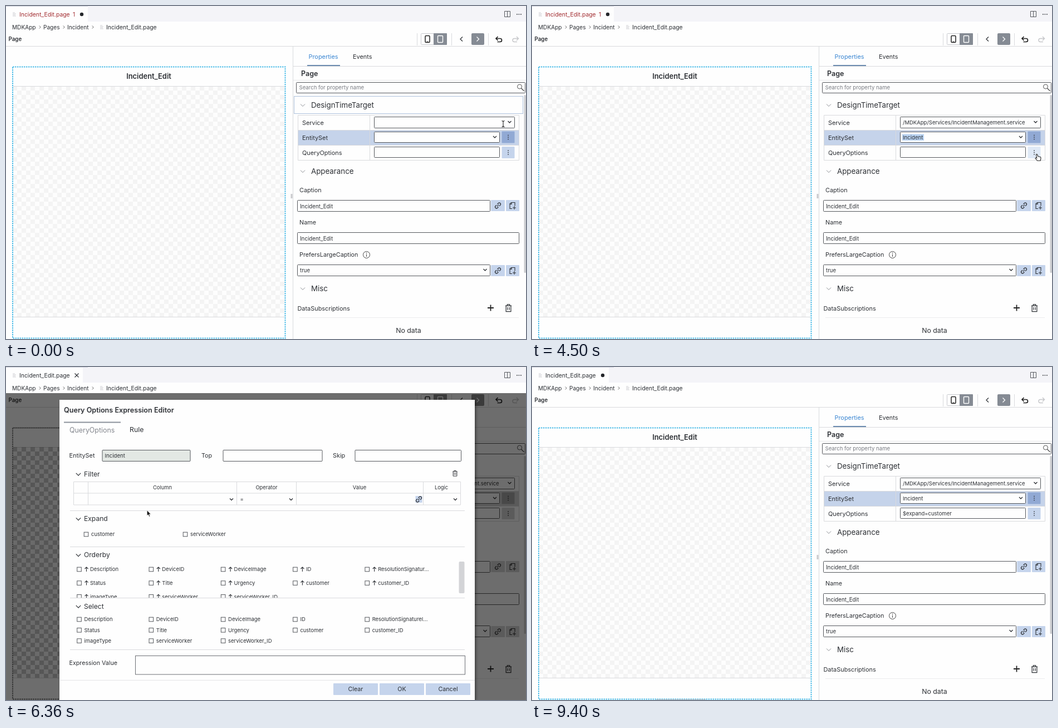
These frames come from a looping animation (934 px wide and 599 px high, 9900 ms). An HTML page:

```html
<!DOCTYPE html>
<html lang="en">
<head>
<meta charset="utf-8">
<title>Page editor</title>
<style>
  html, body { margin: 0; width: 100%; height: 100%; overflow: hidden; background: #fefefe; }
  svg { display: block; font-family: Inter, "Open Sans", sans-serif; }
  text { white-space: pre; }
</style>
</head>
<body>
<svg id="stage" width="934" height="599" viewBox="0 0 934 599"></svg>
<script>
const LOOP = 9900, INK = '#2d3035', BLUE = '#c5d4ec', EDGE = '#d9dadd';
const SERVICE = '/MDKApp/Services/IncidentManagement.service';

// Markup helpers; text is centred vertically on y.
const text = (x, y, value, size = 10.9, more = '', fill = INK) =>
  `<text x="${x}" y="${y + size * .364}" font-size="${size}" fill="${fill}" ${more}>${value}</text>`;
const rect = (x, y, w, h, fill, more = '') =>
  `<rect x="${x}" y="${y}" width="${w}" height="${h}" fill="${fill}" ${more}/>`;
const path = (d, stroke = INK, width = 1, more = '') =>
  `<path d="${d}" fill="none" stroke="${stroke}" stroke-width="${width}" ${more}/>`;
const group = (id, body) => `<g id="${id}">${body}</g>`;
const hLine = (x1, x2, y, color = EDGE, width = 1, more = '') => path(`M${x1} ${y}H${x2}`, color, width, more);
const vLine = (x, y1, y2, color = EDGE) => path(`M${x} ${y1}V${y2}`, color);
const box = (x, y, w, h, fill = '#fefefe') => rect(x, y, w, h, fill, 'stroke="#55585d" rx="1"');
const down = (x, y, r = 3, color = INK, width = 1.3) =>
  path(`M${x - r} ${y - r / 2}l${r} ${r}l${r} ${-r}`, color, width);
const right = (x, y, r = 2.5, color = '#666', width = 1) =>
  path(`M${x - r / 2} ${y - r}l${r} ${r}l${-r} ${r}`, color, width);
const bold = 'font-weight="600"', mid = 'text-anchor="middle"';

const fileIcon = (x, y) =>
  path(`M${x} ${y - 3}h4M${x} ${y - 1}h6M${x} ${y + 1}h5M${x} ${y + 3}h6`, '#c4c5c9', .8);
const link = (x, y) => path('M-1 -2.2h-2.2a2.2 2.2 0 0 0 0 4.4h2.2M1 -2.2h2.2a2.2 2.2 0 0 1 0 4.4h-2.2M-2 0h4',
  INK, 1.1, `transform="translate(${x} ${y}) rotate(-45) scale(1.1)"`);
const trash = (x, y, k = 1) => path('M-5 -4h10M-2 -4v-2h4v2M-4 -4v9.5h8v-9.5M-1.5 -1.5v4.5M1.5 -1.5v4.5',
  INK, 1.1, `transform="translate(${x} ${y}) scale(${k})"`);
const dots = (x, y) => [-3.5, 0, 3.5].map(d => rect(x - .7, y + d - .7, 1.5, 1.5, INK)).join('');
const iconButtons = y => rect(871, y, 25, 20, BLUE, 'rx="1"') + link(883.5, y + 10) +
  rect(898, y, 24, 20, BLUE, 'rx="1"') +
  path(`M909 ${y + 15.5}h-4v-9l3-2h6v6M908 ${y + 4.5}v3h-3M910 ${y + 14}h6M913 ${y + 11}v6`, INK, 1.1);
const section = (y, title) => down(533, y, 4, '#8a8d92', 1) + text(548, y, title, 13.3);
const tableButton = (id, y) => rect(890.5, y - 10.5, 23, 21, BLUE, `id="${id}" rx="1"`) + dots(902, y);

const header = rect(0, 0, 934, 47, '#fefefe') + rect(0, 0, 934, 28, '#f4f4f8') +
  rect(0, 0, 147, 28.5, '#fefefe', 'id="tab"') + hLine(0, 147, .5, '#d0d3df') +
  fileIcon(12, 15) + text(24, 15, 'Incident_Edit.page', 10.4, 'id="tabName"') +
  text(120, 15, '1', 10.2, 'id="errors"') +
  '<circle id="dirty" cy="15" r="3.2" fill="#25272b"/>' +
  path('M123.5 11.5l7 7m0-7l-7 7', INK, 1.1, 'id="clean"') +
  path('M895.5 9.5h10v10h-10zM900.5 9.5v10', '#55585d') +
  [918, 921.5, 925].map(x => rect(x - 1, 14, 1.8, 1.8, '#55585d')).join('') +
  text(11, 38, 'MDKApp', 10.1) + right(61, 38) + text(67, 38, 'Pages', 10.1) + right(104, 38) +
  text(110, 38, 'Incident', 10.2) + right(156, 38) + fileIcon(169, 38) +
  text(180, 38, 'Incident_Edit.page', 10.4);

const toolbar = text(4.5, 59.5, 'Page', 9.8, bold) + hLine(0, 934, 72.5) +
  vLine(738.5, 49, 71) + vLine(800.5, 49, 71) + vLine(866.5, 49, 71) +
  rect(745.5, 49.5, 46, 20, '#fefefe', 'stroke="#c8cacf" rx="1"') + rect(768, 49, 24, 21, '#858b94', 'rx="1"') +
  rect(753, 53.5, 8, 12, '#fefefe', 'stroke="#222" stroke-width="1.5" rx="1.5"') +
  rect(775.5, 53.5, 9, 12, 'none', 'stroke="#fff" stroke-width="1.4" rx="1"') + hLine(755.5, 758.5, 64, '#222') +
  path('M820 55.5l-4 4l4 4', INK, 1.2) + rect(836, 49, 23, 21, '#858b94', 'rx="2"') +
  right(847.5, 59.5, 4, '#fff', 1.3) +
  path('M883.5 55l-3.5 3.5l3.5 3.5M880.5 58.5h7a3 3 0 0 1 0 6h-5', '#222', 1.7) +
  path('M917 55l3.5 3.5l-3.5 3.5M920 58.5h-7a3 3 0 0 0 0 6h5', '#c5c6c9', 1.4);

const canvasArea = rect(13, 144, 488, 415, 'url(#checker)') + hLine(13, 500, 144.5) + hLine(13, 500, 559.5) +
  text(256.5, 126.5, 'Incident_Edit', 12.9, bold + ' ' + mid) +
  rect(12, 109.5, 489.5, 488, 'none', 'stroke="#4bbce8" stroke-width="2" stroke-dasharray="2.5 1.5"');

const properties = vLine(515.5, 73, 599) + rect(511.5, 338, 3, 8, '#c9cacd') +
  text(543.5, 91, 'Properties', 10.9, '', '#3a86d2') + text(623, 91, 'Events') +
  hLine(516, 934, 108.5) + hLine(541, 600, 107, '#6d8cb0', 2) +
  text(530, 121.5, 'Page', 12.5, bold) + hLine(516, 934, 133.5, '#e6e7e9') +
  box(521.5, 137.5, 411, 19) + text(526.5, 147, 'Search for property name', 9.6, '', '#777a80') +
  '<circle cx="922.5" cy="145" r="4" fill="none" stroke="#555"/>' + path('M925.5 148l5 5', '#555', 1.4) +
  rect(930.5, 160, 3.5, 320, '#cbccd0', 'rx="1.5"') +
  rect(517.5, 162.5, 411, 31, 'none', 'id="focus" stroke="#aec2dc"') + section(178.5, 'DesignTimeTarget') +
  rect(524, 223, 397, 27, '#c5d3ea', 'id="entityRow"') +
  path('M524.5 196.5h397v81h-397zM524 223.5h397M524 250.5h397M653.5 196v81', EDGE) +
  text(532, 210, 'Service') + text(532, 237, 'EntitySet') + text(532, 264, 'QueryOptions') +
  box(661.5, 199.5, 252, 20) + down(904.5, 208.5) + text(666, 210, SERVICE, 9.5, 'id="service"') +
  box(661.5, 226.5, 225, 19) + rect(665, 230.5, 39, 11.5, '#b9d3f2', 'id="selection"') +
  text(666, 236.3, 'Incident', 9.6, 'id="entity"') +
  rect(870, 227, 16, 18, '#dce8f7', 'id="arrowHover"') + group('entityArrow', down(878, 235.5)) +
  tableButton('entityButton', 236) + box(661.5, 253.5, 225, 19) + tableButton('queryButton', 263.5) +
  text(666, 263.5, '$expand=customer', 9.5, 'id="query"') +
  section(297.5, 'Appearance') + text(527, 331, 'Caption', 10.8) +
  box(523.5, 349.5, 346, 20) + text(528, 360, 'Incident_Edit', 9.75) + iconButtons(349) +
  text(527, 389.5, 'Name', 10.8) + box(523.5, 407.5, 398, 20) + text(528, 418, 'Incident_Edit', 9.75) +
  text(527, 447.5, 'PrefersLargeCaption', 10.8) +
  '<circle cx="647.5" cy="447.5" r="6" fill="none" stroke="#444"/>' + vLine(647.5, 446.5, 451, '#444') +
  rect(646.8, 443.7, 1.4, 1.4, '#444') +
  box(523.5, 465.5, 346, 20) + text(528, 476, 'true', 9.6) + down(860.5, 474.5) + iconButtons(466) +
  section(508.5, 'Misc') + text(523.5, 544.5, 'DataSubscriptions') +
  path('M865 543h11M870.5 537.5v11', '#222', 1.8) + trash(902.5, 543.5, 1.1) +
  hLine(527, 921, 560.5, '#ececee') + text(723, 583.5, 'No data', 12.3, mid);

const dropdowns =
  group('serviceList', rect(661.5, 220.5, 252, 46, '#fefefe', 'stroke="#444" filter="url(#shadow)"') +
    rect(662, 223, 251, 15, BLUE, 'id="serviceHover"') + text(667, 230.5, SERVICE, 9.4)) +
  group('entityList', rect(661.5, 246.5, 225, 93.5, '#fefefe', 'stroke="#444" filter="url(#shadow)"') +
    rect(662, 293.5, 224, 15, BLUE, 'id="entityHover"') + vLine(666.5, 230, 242, '#333') +
    ['Customer', 'ErrorArchive', 'EventLog', 'Incident', 'ServiceWorker']
      .map((name, i) => text(667, 256 + i * 15, name, 9.4)).join(''));

const dim = rect(0, 47, 934, 552, '#000', 'fill-opacity=".57"') +
  rect(13, 144, 83, 415, 'url(#darkChecker)') +
  path('M96 109.5H12V597.5H96', '#333', 1.5, 'stroke-dasharray="2.5 1.5"');

const checkbox = (x, y) => rect(x - 3.8, y - 3.8, 7.6, 7.6, 'none', 'stroke="#55585d"');
const upArrow = (x, y) => path(`M${x} ${y + 4}v-8M${x - 3} ${y - 1}l3 -3l3 3`, INK, 1.1);
const fields = ['Description', 'DeviceID', 'DeviceImage', 'ID', 'Resolution', 'Status', 'Title', 'Urgency',
  'customer', 'customer_ID', 'imageType', 'serviceWorker', 'serviceWorker_ID'];
const fieldGrid = (top, step, longName, sorted) => fields.map((name, i) => {
  const x = 131.5 + i % 5 * 129.3, y = top + Math.floor(i / 5) * step;
  const label = name === 'Resolution' ? longName : name;
  return checkbox(x, y) + (sorted ? upArrow(x + 13, y) : '') + text(x + (sorted ? 19.5 : 9), y, label, 9.45);
}).join('');
const heading = (y, title) => down(130, y + .5, 4.2, INK, 1.2) + text(140, y, title, 12.1);
const dialogButton = (x, label, id) => rect(x, 569, 80, 21, BLUE, `id="${id}" rx="1"`) +
  text(x + 40, 579.5, label, 10.7, mid);

const dialog = rect(96, 59, 746, 540, '#fefefe', 'filter="url(#shadow)"') +
  text(104, 77, 'Query Options Expression Editor', 12.6, bold) +
  hLine(104, 206, 99.5, '#8c919c', 2) + text(114, 113, 'QueryOptions', 12.4, '', '#84878e') +
  text(222, 113, 'Rule', 12.3) +
  text(113.5, 159, 'EntitySet') + box(173, 149.5, 158, 20, '#e3e8e4') + text(177.5, 160, 'Incident', 9.6) +
  text(351, 159, 'Top', 10.7) + box(390, 149.5, 178, 20) +
  text(587, 159, 'Skip', 10.9) + box(627, 149.5, 190.5, 20) +
  heading(192.5, 'Filter') + trash(806.5, 191.5, .85) +
  path('M121.5 206.5H816.5V248H121.5zM121 227H817M147.5 206V248M414.5 206V248M521.5 206V248M749.5 206V248', EDGE) +
  [[281, 'Column'], [468, 'Operator'], [635, 'Value'], [782, 'Logic']]
    .map(([x, name]) => text(x, 216.5, name, 9.35, mid)).join('') +
  [405, 512, 807].map(x => down(x, 238)).join('') + text(420.5, 238, '=', 9.4) +
  rect(735.5, 232, 12, 12, BLUE) + link(741.5, 238) +
  [258.5, 323.5, 415.5, 508.5].map(y => hLine(115, 824, y)).join('') + hLine(97, 842, 563.5, '#e4e5e7') +
  heading(273, 'Expand') + checkbox(144, 301) + text(153, 301, 'customer', 9.5) +
  checkbox(322, 301) + text(331, 301, 'serviceWorker', 9.35) +
  group('checked', path('M141.5 301l2 2l3.5 -4', '#2a5b9c', 1.3) + hLine(121, 298, 316, '#aeb4bd')) +
  heading(338, 'Orderby') + `<g clip-path="url(#orderClip)">${fieldGrid(364, 24.6, 'ResolutionSignatur...', true)}</g>` +
  rect(813.5, 350, 10, 57, '#d3d4d7', 'rx="2"') +
  heading(430.5, 'Select') + fieldGrid(454, 19.3, 'ResolutionSignatureI...', false) +
  text(113.5, 532, 'Expression Value', 10.7) + rect(232.5, 519.5, 592, 33.5, 'none', 'stroke="#6c6f75"') +
  text(237, 528, '$expand=customer', 9.5, 'id="expression"') +
  dialogButton(588, 'Clear', 'clear') + dialogButton(671, 'OK', 'ok') + dialogButton(754, 'Cancel', 'cancel');

// Pointer shapes, each with its hot spot at the origin.
const pointers =
  group('beam', path('M-2.5 -5.5q2.5 0 2.5 2v7q0 2 -2.5 2M2.5 -5.5q-2.5 0 -2.5 2v7q0 2 2.5 2', '#222', 1.1)) +
  group('hand', '<path d="M-1.5 -4q1.5 -1.2 2.3 .5l1.2 3.2l3.5 .6q1.8 .5 1.5 2.5l-.8 4.5h-5.5l-3.5 -4q-.5 -1.5 1.5 -1.2l1 .6z" fill="#fff" stroke="#222" stroke-width="1.1"/>') +
  group('arrow', '<path d="M0 0v10l2.3 -2l1.7 3.7l1.7 -.8l-1.7 -3.5h3.2z" fill="#111" stroke="#fff" stroke-width=".8"/>');

const checker = (id, back, cell) => `<pattern id="${id}" x="12" y="144" width="16" height="16" patternUnits="userSpaceOnUse">
  ${rect(0, 0, 16, 16, back) + rect(0, 0, 8, 8, cell) + rect(8, 8, 8, 8, cell)}</pattern>`;

document.getElementById('stage').innerHTML = `<defs>
  ${checker('checker', '#fdfdfd', '#f4f4f4')}${checker('darkChecker', '#00000008', '#00000026')}
  <clipPath id="orderClip">${rect(115, 350, 700, 65, '#000')}</clipPath>
  <filter id="shadow" x="-10%" y="-10%" width="125%" height="135%">
    <feDropShadow dx="2" dy="3" stdDeviation="2.5" flood-opacity=".45"/></filter></defs>` +
  group('page', rect(0, 0, 934, 599, '#fefefe') + toolbar + canvasArea + properties + dropdowns +
    hLine(223, 312, 598.5, '#b9bcc2', 1.5, 'id="footer"')) +
  group('dim', dim) + group('dialog', dialog) + header + group('pointer', pointers);

const el = Object.fromEntries([...document.querySelectorAll('#stage [id]')].map(node => [node.id, node]));
const show = (id, on) => el[id].style.display = on ? '' : 'none';
const set = (id, name, value) => el[id].setAttribute(name, value);

// Keys are [time, ...values]; values between two keys are interpolated.
function track(keys, t, ease = p => p) {
  const next = keys.findIndex(key => key[0] > t);
  if (next < 0) return keys.at(-1).slice(1);
  if (!next) return keys[0].slice(1);
  const a = keys[next - 1], b = keys[next], p = ease((t - a[0]) / (b[0] - a[0]));
  return a.slice(1).map((v, i) => v + (b[i + 1] - v) * p);
}
const smooth = p => p * p * (3 - 2 * p);

const route = [[0, 893, 212], [30, 893, 212], [330, 897, 212], [630, 897, 212], [1200, 752, 232], [1730, 752, 232],
  [2450, 871, 247], [3000, 871, 247], [3600, 692, 302], [4030, 692, 302], [4480, 907, 271], [5630, 907, 271],
  [6160, 262, 254], [6260, 262, 254], [6860, 145, 302], [7730, 145, 302], [7930, 623, 573], [8030, 648, 580],
  [8260, 648, 580], [8560, 699, 590], [9330, 699, 592]];
const shapes = [[0, 'beam'], [200, 'arrow'], [2350, 'hand'], [3100, 'arrow'], [4380, 'hand'], [5700, 'arrow'],
  [6820, 'hand'], [7800, 'beam'], [8350, 'hand']];
const dimming = [[6000, 0], [6120, 1], [9030, 1], [9130, 0]];
const fading = [[6120, 0], [6160, .17], [6360, 1], [8830, 1], [8960, .35], [9030, 0]];

function draw(t) {
  const between = (from, to) => t >= from && t < to;

  const errors = t < 1330 ? 1 : t < 3650 ? 2 : t < 4960 ? 1 : 0;
  const saved = between(6300, 9130);
  set('tab', 'width', errors === 2 ? 149 : errors ? 147 : 138);
  set('tabName', 'fill', errors ? '#a12b2f' : INK);
  set('errors', 'fill', '#a12b2f');
  el.errors.textContent = errors || '';
  set('dirty', 'cx', errors === 2 ? 137.5 : errors ? 136 : 127);
  show('dirty', !saved);
  show('clean', saved);

  const listOpen = between(2660, 3650), rowHover = between(2350, 3650);
  show('focus', t < 130);
  show('service', t >= 1300);
  show('serviceList', between(300, 1300));
  show('serviceHover', t >= 900);
  set('entityRow', 'fill', rowHover ? '#ebf0f6' : '#c5d3ea');
  set('entityButton', 'fill', rowHover ? BLUE : '#91a9d4');
  set('queryButton', 'fill', between(4400, 5700) ? '#dfe9f6' : BLUE);
  show('entity', t >= 3650);
  show('selection', between(3650, 5130));
  show('arrowHover', rowHover);
  set('arrowHover', 'fill', listOpen ? '#d3e2f5' : '#dce8f7');
  set('entityArrow', 'opacity', listOpen ? .15 : 1);
  show('entityList', listOpen);
  show('entityHover', t >= 3450);
  show('query', t >= 8830);
  show('footer', t >= 9330);

  const [dimmed] = track(dimming, t);
  el.page.style.filter = dimmed ? `grayscale(${dimmed})` : '';
  set('dim', 'opacity', dimmed);
  set('dialog', 'opacity', track(fading, t)[0]);
  show('checked', t >= 7100);
  show('expression', t >= 7150);
  set('ok', 'fill', t > 8450 ? '#dfe9f6' : BLUE);

  const [x, y] = track(route, t, smooth);
  const shape = shapes.findLast(key => key[0] <= t)[1];
  set('pointer', 'transform', `translate(${x} ${y})`);
  for (const name of ['beam', 'hand', 'arrow']) show(name, name === shape);
  show('pointer', t < 9330);
}

const start = performance.now();
function tick() {
  draw((performance.now() - start) % LOOP);
  requestAnimationFrame(tick);
}
tick();
</script>
</body>
</html>
```
